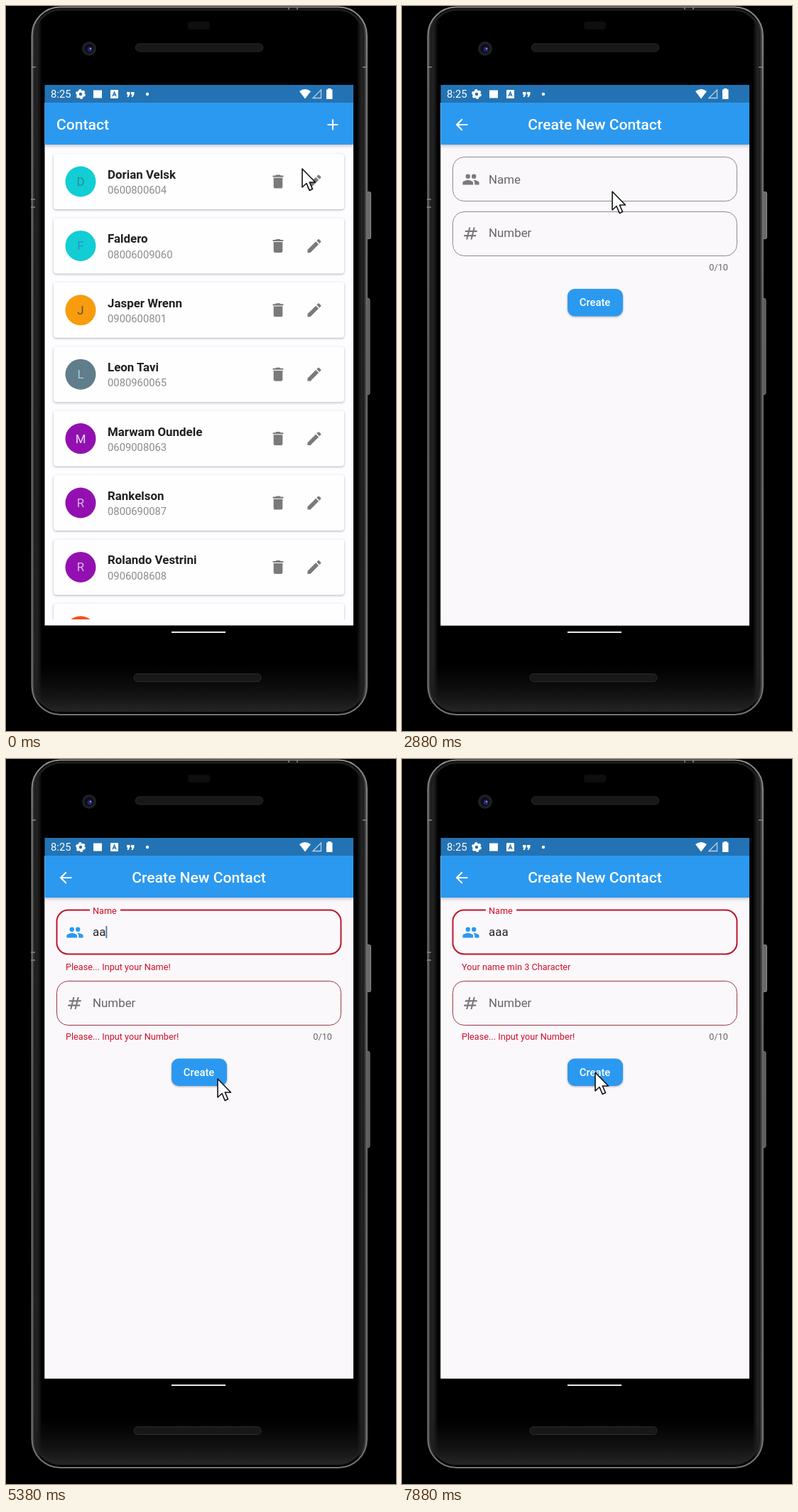
Recreate the animation shown at these times as an HTML page. Size 549x1020 px, loop 8 s.

```html
<!DOCTYPE html>
<html lang="en">
<head>
<meta charset="utf-8">
<title>Contact list and form</title>
<style>
html, body { margin: 0; width: 100%; height: 100%; overflow: hidden; background: #000; }
svg { display: block; width: 549px; height: 1020px; font-family: Roboto, sans-serif; }
.card { filter: drop-shadow(0 1.5px 1.5px rgba(0,0,0,.3)); }
.bar { filter: drop-shadow(0 2px 2px rgba(0,0,0,.22)); }
</style>
</head>
<body>
<svg viewBox="0 0 549 1020">
  <defs>
    <linearGradient id="side">
      <stop offset="0" stop-color="#4a4a4b"/><stop offset=".008" stop-color="#2c2c2d"/>
      <stop offset=".02" stop-color="#1a1a1b"/><stop offset=".03" stop-color="#000"/>
      <stop offset=".97" stop-color="#000"/><stop offset=".98" stop-color="#1a1a1b"/>
      <stop offset=".992" stop-color="#343435"/><stop offset="1" stop-color="#5a5a5b"/>
    </linearGradient>
    <linearGradient id="chin" x2="0" y2="1">
      <stop offset="0" stop-color="#111" stop-opacity="0"/>
      <stop offset="1" stop-color="#252426"/>
    </linearGradient>
    <linearGradient id="rim" x2="0" y2="1">
      <stop offset="0" stop-color="#8a8a8a"/><stop offset=".1" stop-color="#767676"/>
      <stop offset=".5" stop-color="#666"/><stop offset="1" stop-color="#747474"/>
    </linearGradient>
    <clipPath id="screen"><rect x="54.5" y="136" width="434.5" height="735.5"/></clipPath>
    <clipPath id="rows"><rect x="54" y="190" width="435" height="673"/></clipPath>
  </defs>

  <g id="phone">
    <rect x="508" y="261.5" width="5.5" height="66" rx="2" fill="#6a6a6b" stroke="#8a8a8a"/>
    <rect x="507" y="411.5" width="5" height="135" rx="2" fill="#5a5a5b" stroke="#808080"/>
    <rect x="36.5" y="1.5" width="471.5" height="995.5" rx="40" fill="url(#side)" stroke="url(#rim)" stroke-width="2"/>
    <rect x="41" y="5" width="462" height="987" rx="36" fill="none" stroke="#1e1e1f" stroke-width="3"/>
    <path d="M43 925H501V956Q501 992 465 992H79Q43 992 43 956Z" fill="url(#chin)"/>
    <path d="M36 86h6M502 86h6M398 1v4M410 1v4M35 272h6M35 283h6" stroke="#888" stroke-width="1.5"/>
    <rect x="256" y="22" width="31" height="11" rx="4" fill="#0e0e0f"/>
    <rect x="182.5" y="53" width="179" height="11" rx="5" fill="#191718" stroke="#2d2a2b"/>
    <rect x="180" y="939.5" width="179" height="11" rx="5" fill="#191718" stroke="#2d2a2b"/>
    <circle cx="117" cy="60" r="10" fill="#202022"/>
    <circle cx="117" cy="60" r="6.5" fill="#0c0c20"/>
    <circle cx="118" cy="61" r="3.5" fill="#26265e"/>
    <circle cx="119" cy="60" r="1.2" fill="#8a90d8"/>
    <rect x="233" y="880" width="76" height="2" fill="#e8e8e8"/>
  </g>

  <g clip-path="url(#screen)">
    <g id="list"></g>
    <g id="form"></g>
  </g>

  <g id="status" fill="#fff">
    <rect x="54.5" y="111" width="434.5" height="25" fill="#2373b4"/>
    <text x="63" y="129.3" font-size="14.8">8:25</text>
    <circle cx="105" cy="124" r="4" fill="none" stroke="#fff" stroke-width="3.6"/>
    <circle cx="105" cy="124" r="6" fill="none" stroke="#fff" stroke-width="2" stroke-dasharray="3.2 3.08"/>
    <rect x="123" y="118.5" width="12" height="11"/>
    <rect x="147" y="118" width="11" height="12" rx="1"/>
    <path d="M150 127l2.5-6 2.5 6M151 125h3" fill="none" stroke="#2373b4" stroke-width="1.3"/>
    <path d="M170 121h4.5v3l-2 4h-2l1-3.5h-1.5zM176 121h4.5v3l-2 4h-2l1-3.5H176z"/>
    <circle cx="199" cy="124" r="2.2"/>
    <path d="M413 120Q421 114 429 120L421 130.5Z"/>
    <path d="M432 129.5H443.5V118Z" fill="none" stroke="#b5d2ea" stroke-width="1.3"/>
    <path d="M453 116h4.5v1.5H459.5V131H451V117.5H453Z"/>
  </g>

  <path id="pointer" d="M0 0V26L6 20.5L10.2 30.5L14.5 28.5L10.3 19H18.5Z"
        fill="#fff" stroke="#111" stroke-width="1.6" stroke-linejoin="round"/>
</svg>

<script>
const $ = id => document.getElementById(id);
const BLUE = '#2b99f0', RED = '#cc1228', GREY = '#7a7a7a';

const ICONS = {
  trash: 'M6 19c0 1.1.9 2 2 2h8c1.1 0 2-.9 2-2V7H6zM19 4h-3.5l-1-1h-5l-1 1H5v2h14z',
  pencil: 'M3 17.25V21h3.75L17.81 9.94l-3.75-3.75zM20.71 7.04a1 1 0 0 0 0-1.41l-2.34-2.34a1 1 0 0 0-1.41 0l-1.83 1.83 3.75 3.75z',
  plus: 'M19 13h-6v6h-2v-6H5v-2h6V5h2v6h6z',
  back: 'M20 11H7.83l5.59-5.59L12 4l-8 8 8 8 1.41-1.41L7.83 13H20z',
  people: 'M13 8a3 3 0 1 1 6 0a3 3 0 1 1-6 0zM5 8a3 3 0 1 1 6 0a3 3 0 1 1-6 0zM8 13c-2.33 0-7 1.17-7 3.5V19h14v-2.5C15 14.17 10.33 13 8 13zM16 13l-.97.05C16.19 13.89 17 15.02 17 16.5V19h6v-2.5C23 14.17 18.33 13 16 13z',
  hash: 'M20.5 10l.5-2h-4l1-4h-2l-1 4h-4l1-4h-2l-1 4H5l-.5 2h4l-1 4h-4L3 16h4l-1 4h2l1-4h4l-1 4h2l1-4h4l.5-2h-4l1-4zm-7 4h-4l1-4h4z'
};

const icon = (name, x, y, fill = GREY) =>
  `<path d="${ICONS[name]}" fill="${fill}" transform="translate(${x} ${y}) scale(1.057) translate(-12 -12)"/>`;

// y is the middle of the capital letters
const text = (str, x, y, size, fill, weight = 400, anchor = 'start') =>
  `<text x="${x}" y="${y + size * .355}" font-size="${size}" fill="${fill}" font-weight="${weight}" text-anchor="${anchor}">${str}</text>`;

const rect = (x, y, w, h, fill, extra = '') =>
  `<rect x="${x}" y="${y}" width="${w}" height="${h}" fill="${fill}" ${extra}/>`;

const appBar = inner => rect(54, 136, 435, 59, BLUE, 'class="bar"') + inner;

const people = [
  ['Dorian Velsk', '0600800604', '#12cdd4', '#2a8c9c'],
  ['Faldero', '08006009060', '#12cdd4', '#2f8ec4'],
  ['Jasper Wrenn', '0900600801', '#f89c0e', '#5c4a30'],
  ['Leon Tavi', '0080960065', '#607d8b', '#a5cfdf'],
  ['Marwam Oundele', '0609008063', '#9310b0', '#e6e0f4'],
  ['Rankelson', '0800690087', '#9310b0', '#d9b8e6'],
  ['Rolando Vestrini', '0906008608', '#9310b0', '#d9b8e6'],
  ['Sedlo', '0680090062', '#f1511b', '#fff']
];

function contactCard([name, phone, color, ink], i) {
  const y = 247 + i * 90.4;
  return rect(67, y - 39, 409, 78, '#fffeff', 'rx="4" class="card"') +
    `<circle cx="105" cy="${y}" r="21.5" fill="${color}"/>` +
    text(name[0], 105, y, 16.9, ink, 400, 'middle') +
    text(name, 143, y - 10, 16.9, '#202020', 700) +
    text(phone, 143, y + 12, 14.8, '#8c8c8c') +
    icon('trash', 383, y) + icon('pencil', 434, y);
}

$('list').innerHTML = rect(54, 136, 435, 736, '#fdfcfe') +
  `<g clip-path="url(#rows)">${people.map(contactCard).join('')}</g>` +
  appBar(text('Contact', 71, 167, 21.1, '#fff', 500) + icon('plus', 460, 167, '#fff'));

const box = (y, color, width = 1) =>
  rect(71.5, y + .5, 400, 62, 'none', `rx="16" stroke="${color}" stroke-width="${width}"`);

function form({ error, focus, typed, caret }) {
  const shift = error ? 23.5 : 0, page = '#fbf8fc';
  const edge = error ? '#983a42' : '#8c8a8e';
  let out = rect(54, 136, 435, 736, page) +
    appBar(icon('back', 84, 167, '#fff') + text('Create New Contact', 271.5, 167, 21.1, '#fff', 500, 'middle')) +
    box(212, focus ? '#b8162a' : edge, focus ? 2 : 1) +
    icon('people', 97, 244, focus ? BLUE : GREY);
  if (focus) {
    out += rect(118, 209, 43, 8, page) + text('Name', 122, 213.5, 12.7, RED) +
      text(typed, 122, 243.5, 16.9, '#252525');
    if (caret) out += rect(122 + typed.length * 9.2, 235, 2, 17, typed ? '#5a7fa5' : BLUE);
  } else {
    out += text('Name', 122, 244, 16.9, '#666');
  }
  out += box(289 + Math.floor(shift), edge) + icon('hash', 96.5, 320 + shift) +
    text('Number', 122, 319.5 + shift, 16.9, '#666') +
    text('0/10', 459, 367 + shift, 12.7, '#666', 400, 'end');
  if (error) out += text(error, 84, 292, 12.7, RED) + text('Please... Input your Number!', 84, 390.5, 12.7, RED);
  return out + rect(233, 398 + shift, 78, 38.5, BLUE, 'rx="10" class="card"') +
    text('Create', 271.5, 417 + shift, 14.8, '#fff', 500, 'middle');
}

// time, x, y of the pointer tip
const path = [
  [0, 417, 229], [1125, 463, 160], [1875, 463, 160], [2625, 296, 261], [3000, 296, 261],
  [3500, 268, 418], [3875, 205, 246], [4250, 245, 363], [4750, 298, 450], [5500, 298, 450],
  [6625, 230, 250], [7000, 235, 267], [7500, 268, 430], [7875, 272, 441]
];
const ease = p => p * p * (3 - 2 * p);

function pointerAt(t) {
  const i = path.findIndex(k => k[0] >= t);
  if (i < 1) return path[i ? path.length - 1 : 0].slice(1);
  const [a, b] = [path[i - 1], path[i]];
  const p = ease((t - a[0]) / (b[0] - a[0]));
  return [1, 2].map(n => a[n] + (b[n] - a[n]) * p);
}

const OPEN = 1875, FAIL = 3500, FOCUS = 3875, SHORT = 5625;
const keys = [4875, 5125, 7375];
const STEP = 125, LOOP = 8000;

function draw(t) {
  $('pointer').setAttribute('transform', `translate(${pointerAt(t)})`);
  const p = Math.min(1, Math.max(0, (t - OPEN + STEP) / 375));
  const s = .85 + .15 * ease(p);
  $('form').setAttribute('opacity', p);
  $('form').setAttribute('transform', `translate(271.5 504) scale(${s}) translate(-271.5 -504)`);
  const pressed = keys.filter(k => k <= t);
  const lastInput = pressed.at(-1) ?? FOCUS;
  $('form').innerHTML = form({
    error: t < FAIL ? '' : t < SHORT ? 'Please... Input your Name!' : 'Your name min 3 Character',
    focus: t >= FOCUS,
    typed: 'a'.repeat(pressed.length),
    caret: (t - lastInput) % 1000 < 500
  });
}

let shown = -1;
function tick() {
  const t = Math.floor(performance.now() % LOOP / STEP) * STEP;
  if (t !== shown) draw(shown = t);
  requestAnimationFrame(tick);
}
tick();
</script>
</body>
</html>
```
